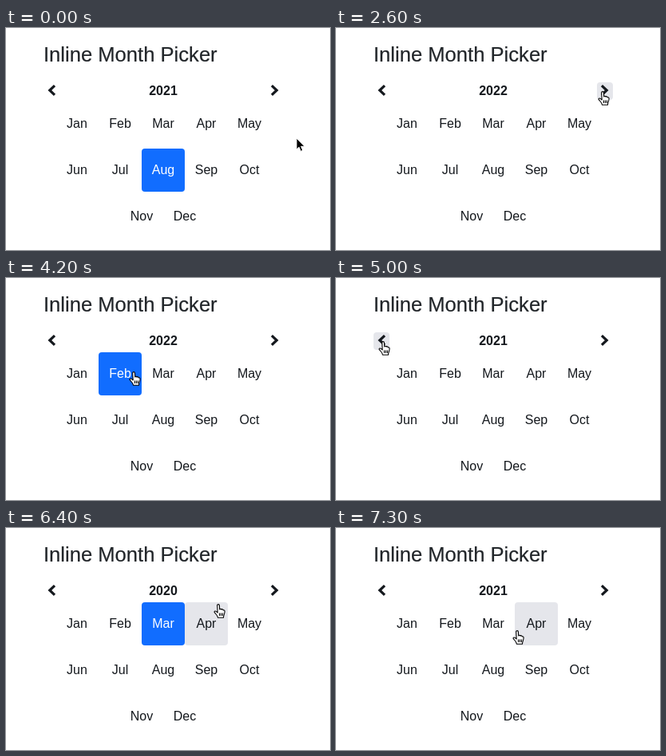
Animation of 406x278 px, one loop 7400 ms. Source, as an HTML page:

```html
<!DOCTYPE html>
<html lang="en">
<head>
<meta charset="utf-8">
<title>Inline Month Picker</title>
<style>
  html, body { margin: 0; width: 100%; height: 100%; overflow: hidden; background: #fff; }
  svg { display: block; width: 406px; height: 278px; cursor: default; }
  text { font: 16px "Liberation Sans", Arial, sans-serif; fill: #14181d; text-anchor: middle; }
  .title { font-size: 25.6px; text-anchor: start; fill: #212529; stroke: #212529; stroke-width: .2px; }
  .year { font-weight: bold; }
  .button rect { fill: transparent; }
  .button path { fill: none; stroke: #14181d; stroke-width: 3.2; }
  .hover rect { fill: #e5e6eb; }
  .selected rect { fill: #116dff; }
  .selected text { fill: #fff; }
</style>
</head>
<body>
<svg viewBox="0 0 406 278">
  <text class="title" x="47" y="42">Inline Month Picker</text>
  <text class="year" x="197" y="84"></text>
  <g id="buttons"></g>
  <g id="cursor">
    <path id="arrow" d="M0 0V14.2L3.2 11.2L5.4 16.4L7.9 15.3L5.7 10.3H10.2Z" fill="#000" stroke="#fff"/>
    <g id="hand" transform="translate(-5.5 -1)" stroke="#000" stroke-width="1.1" stroke-linejoin="round">
      <path fill="#fff" d="M4.2 1.7C4.2 .3 6.8 .3 6.9 1.7L7.2 7C7.6 5.8 9.2 6 9.4 7.2C10 6.3 11.4 6.6 11.6 8C12.4 7.4 13.6 8 13.6 9.2C13.6 13 12 14 12 17.2H5C5 15 3 13.5 .8 10.6C0 9.4 1.5 8.4 2.8 9.4L4.7 11Z"/>
      <path fill="none" d="M7 11.5V15M9 11.5V15M11 11.5V15"/>
    </g>
  </g>
</svg>
<script>
const LOOP = 7400, STEP = 100;
const MONTHS = 'Jan Feb Mar Apr May Jun Jul Aug Sep Oct Nov Dec'.split(' ');
const $ = selector => document.querySelector(selector);

// Pointer moves: start, end, target x, target y
const START = [364, 138];
const MOVES = [
  [1100, 1400, 242, 122],
  [1900, 2200, 334, 80],
  [2900, 3200, 214, 112],
  [3600, 4000, 160, 118],
  [4200, 4800, 59, 80],
  [5300, 5800, 208, 138],
  [6300, 6400, 266, 96],
  [6400, 6800, 334, 80],
  [7000, 7300, 227, 129]
];

// Clicks: time, year shown, selected month
const CLICKS = [
  [0, 2021, 'Aug'],
  [1700, 2021, 'Apr'],
  [2500, 2022, ''],
  [3600, 2022, 'Mar'],
  [4200, 2022, 'Feb'],
  [5000, 2021, ''],
  [5300, 2020, ''],
  [6000, 2020, 'Mar'],
  [7000, 2021, '']
];

function addNode(parent, tag, attrs, text = '') {
  const node = document.createElementNS('http://www.w3.org/2000/svg', tag);
  for (const key in attrs) node.setAttribute(key, attrs[key]);
  node.textContent = text;
  return parent.appendChild(node);
}

function addButton(name, x, y, width, height) {
  const node = addNode($('#buttons'), 'g', {});
  addNode(node, 'rect', { x, y, width, height, rx: 4 });
  return { name, x, y, width, height, node };
}

const buttons = MONTHS.map((name, i) => {
  const row = Math.floor(i / 5);
  const x = (row < 2 ? 62 : 143) + i % 5 * 54, y = 93 + row * 58;
  const button = addButton(name, x, y, 54, 54);
  addNode(button.node, 'text', { x: x + 27, y: y + 32 }, name);
  return button;
});
for (const [name, x, d] of [
  ['prev', 47, 'M61 72.2L54.8 78L61 83.8'],
  ['next', 327, 'M333 72.2L339.2 78L333 83.8']
]) {
  const button = addButton(name, x, 68, 20, 22);
  addNode(button.node, 'path', { d });
  buttons.push(button);
}

const ease = p => p * p * (3 - 2 * p);

function pointerAt(t) {
  let [x, y] = START;
  for (const [start, end, toX, toY] of MOVES) {
    if (t <= start) break;
    const p = ease(Math.min(1, (t - start) / (end - start)));
    x += (toX - x) * p;
    y += (toY - y) * p;
  }
  return [x, y];
}

function render(t) {
  const [x, y] = pointerAt(t);
  const [, year, month] = CLICKS.filter(([time]) => time <= t).pop();
  let over = false;
  for (const b of buttons) {
    const inside = x >= b.x && x < b.x + b.width && y >= b.y && y < b.y + b.height;
    over = over || inside;
    const state = b.name === month ? ' selected' : inside ? ' hover' : '';
    b.node.setAttribute('class', 'button' + state);
  }
  $('.year').textContent = year;
  $('#cursor').setAttribute('transform', `translate(${x} ${y})`);
  $('#arrow').style.display = over ? 'none' : '';
  $('#hand').style.display = over ? '' : 'none';
}

const origin = performance.now();
function tick() {
  const t = (performance.now() - origin) % LOOP;
  render(Math.floor(t / STEP) * STEP);
  requestAnimationFrame(tick);
}
tick();
</script>
</body>
</html>
```
